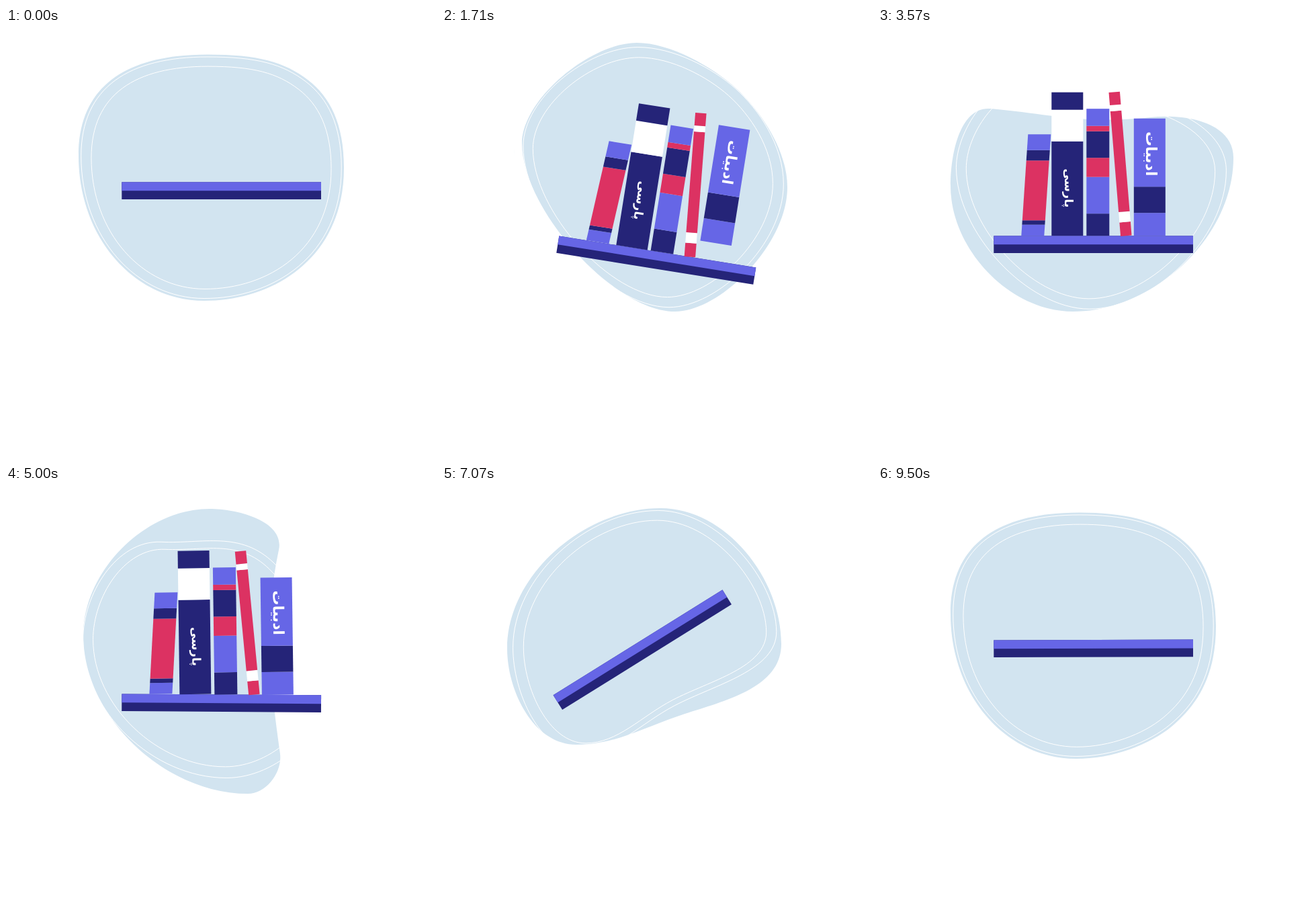
Recreate the animation shown at these times as an HTML page. Size 640x640 px, loop 9570 ms.

```html
<!DOCTYPE html>
<html lang="fa">
<head>
<meta charset="utf-8">
<title>Bookshelf</title>
<style>
  html, body { margin: 0; width: 100%; height: 100%; overflow: hidden; background: #fff; }
  svg { display: block; width: 100vw; height: 100vh; }
  text { font-family: "DejaVu Sans", sans-serif; font-weight: bold; fill: #fff; text-anchor: middle; }
</style>
</head>
<body>
<svg id="stage" viewBox="0 0 640 640"></svg>
<script>
const LOOP = 9570;
const PALE = '#d2e4f0', LILAC = '#6666e6', NAVY = '#252478', RED = '#dc3262', WHITE = '#fff';

// ---- Blob: closed curve through a few nodes, each { x, y, heading, roundness }
const node = (x, y, deg, r = 1) => ({ x, y, deg, r });
const rad = deg => deg * Math.PI / 180;

// Control points between two nodes; handle length follows the distance
function handles(a, b) {
  const d = .36 * Math.hypot(b.x - a.x, b.y - a.y);
  return [
    [a.x + Math.cos(rad(a.deg)) * d * a.r, a.y + Math.sin(rad(a.deg)) * d * a.r],
    [b.x - Math.cos(rad(b.deg)) * d * b.r, b.y - Math.sin(rad(b.deg)) * d * b.r]
  ];
}

// Adds a node halfway along side i without changing the form
function split(nodes, i) {
  const a = nodes[i], b = nodes[i + 1], [p, q] = handles(a, b);
  const x = (a.x + 3 * p[0] + 3 * q[0] + b.x) / 8, y = (a.y + 3 * p[1] + 3 * q[1] + b.y) / 8;
  const deg = Math.atan2(b.y + q[1] - p[1] - a.y, b.x + q[0] - p[0] - a.x) * 180 / Math.PI;
  return [...nodes.slice(0, i + 1), node(x, y, deg, .8), ...nodes.slice(i + 1)];
}

const round = [node(300, 39.5, 0, 1.35), node(503, 208, 90, 1.3), node(295, 406, 180), node(108, 190, 270, 1.2)];
const lean = split([node(290, 22, 0, .85), node(514, 237, 90, .95), node(347, 422, 180, .75), node(119, 172, 270, .8)], 0);
const bowl = [node(168, 120, 5), node(405, 133, -6, 1.2), node(529, 193, 90), node(290, 422, 180), node(108, 235, 270)];
const bite = [node(303, 34, 0), node(406, 95, 102), node(408, 398, 82), node(360, 458, 180), node(115, 222, 270)];
const drop = [node(305, 34, 0), node(476, 137, 90, .5), node(365, 300, 112), node(260, 457, 180, .65), node(120, 225, 270)];
const cap = [node(325, 33, 0), node(505, 235, 90), node(350, 343, 161), node(200, 385, 180), node(97, 242, 270)];

const poses = [
  { at: 0, form: split(round, 0) }, { at: 1710, form: lean }, { at: 2400, form: lean },
  { at: 3570, form: bowl }, { at: 4000, form: bowl }, { at: 5000, form: bite },
  { at: 5710, form: drop }, { at: 7070, form: cap }, { at: LOOP, form: split(round, 1) }
];

// Smooth path through the poses, at rest at both ends of the loop
function formAt(t) {
  let i = 0;
  while (i < poses.length - 2 && t >= poses[i + 1].at) i++;
  const [a, b, before, after] = [poses[i], poses[i + 1], poses[i - 1], poses[i + 2]];
  const d = b.at - a.at, u = (t - a.at) / d;
  const blend = (n, key) => {
    const v = a.form[n][key], w = b.form[n][key];
    const s0 = before ? (w - before.form[n][key]) / (b.at - before.at) : 0;
    const s1 = after ? (after.form[n][key] - v) / (after.at - a.at) : 0;
    return v + (w - v) * u * u * (3 - 2 * u) + d * u * (1 - u) * ((1 - u) * s0 - u * s1);
  };
  return a.form.map((_, n) => node(blend(n, 'x'), blend(n, 'y'), blend(n, 'deg'), blend(n, 'r')));
}

function outline(nodes) {
  const sides = nodes.map((a, i) => {
    const b = nodes[(i + 1) % nodes.length];
    return 'C' + [...handles(a, b), [b.x, b.y]].flat().map(v => v.toFixed(2)).join(' ');
  });
  return `M${nodes[0].x} ${nodes[0].y}${sides.join('')}Z`;
}

// ---- Books: x is the middle of the base along the shelf, bands are stacked upwards
const books = [
  { x: 58, w: 34, pose: 'skewX(-3.8)',
    bands: [[LILAC, 16.5], [NAVY, 6.5], [RED, 89], [NAVY, 15.5], [LILAC, 23.5]] },
  { x: 109.5, w: 47, bands: [[NAVY, 140.5], [WHITE, 47], [NAVY, 26]],
    label: { word: 'پارسی', size: 17.5, x: -4, y: -71 } },
  { x: 155, w: 34,
    bands: [[NAVY, 33], [LILAC, 54.5], [RED, 28.5], [NAVY, 39.5], [RED, 8], [LILAC, 25.5]] },
  { x: 197, w: 16.5, pose: 'rotate(-4.7)',
    bands: [[RED, 20.5], [WHITE, 15.5], [RED, 150.5], [WHITE, 9], [RED, 19]] },
  { x: 232, w: 47, bands: [[LILAC, 34], [NAVY, 39], [LILAC, 101.5]],
    label: { word: 'ادبیات', size: 22, x: -5, y: -122 } }
];

function bookMarkup({ w, pose = '', bands, label }) {
  let y = 0;
  const rects = bands.map(([colour, h]) =>
    `<rect x="${-w / 2}" y="${y -= h}" width="${w}" height="${h}" fill="${colour}"/>`).join('');
  const text = label ? `<text direction="rtl" font-size="${label.size}"
    transform="translate(${label.x} ${label.y}) rotate(90)">${label.word}</text>` : '';
  return `<g class="book"><g transform="${pose}">${rects}${text}</g></g>`;
}

const ringMarkup = k =>
  `<path class="ring" fill="none" stroke="#fff" vector-effect="non-scaling-stroke"
    transform="translate(305.5 223) scale(${k}) translate(-305.5 -223)"/>`;

const stage = document.getElementById('stage');
stage.innerHTML = `<path id="blob" fill="${PALE}"/>${ringMarkup(.981)}${ringMarkup(.904)}
  <g id="shelf">
    <rect y="-12.8" width="296.7" height="25.6" fill="${NAVY}"/>
    <rect y="-12.8" width="296.7" height="12.8" fill="${LILAC}"/>
    ${books.map(bookMarkup).join('')}
  </g>`;
const blob = document.getElementById('blob'), shelf = document.getElementById('shelf');
const rings = stage.querySelectorAll('.ring'), bookEls = stage.querySelectorAll('.book');

// Eased step from 0 to 1 between two times
function ramp(t, from, to) {
  const p = Math.max(0, Math.min(1, (t - from) / (to - from)));
  return (1 - Math.cos(Math.PI * p)) / 2;
}

function draw(t) {
  blob.setAttribute('d', outline(formAt(t)));
  // the rings trail behind the blob and catch up at the end of the loop
  const lag = Math.min(t, 550 * Math.sin(Math.PI * t / LOOP));
  const ring = outline(formAt(t - lag));
  rings.forEach(r => r.setAttribute('d', ring));

  const height = 242.2 + 80 * (ramp(t, 300, 1300) - ramp(t, 8000, 9400));
  const tilt = 9.1 * (ramp(t, 450, 1710) - ramp(t, 1850, 2900)) + 18 * ramp(t, 4900, 6000)
    - 49.9 * ramp(t, 6000, 6900) + 31.9 * ramp(t, 8000, LOOP);
  shelf.setAttribute('transform', `translate(172.3 ${height}) rotate(${tilt})`);

  const sway = 15.5 * (ramp(t, 5950, 6400) - ramp(t, 4800, 5950));
  bookEls.forEach((el, i) => {
    const landed = 300 + 200 * i, thrown = 6030 + 40 * i;
    const lift = 450 * (1 - ramp(t, landed, landed + 723)) + 600 * ramp(t, thrown, thrown + 620);
    el.setAttribute('transform', `translate(${books[i].x} ${-13 - lift}) rotate(${sway})`);
  });
}

const start = performance.now();
function tick() {
  draw((performance.now() - start) % LOOP);
  requestAnimationFrame(tick);
}
tick();
</script>
</body>
</html>
```
